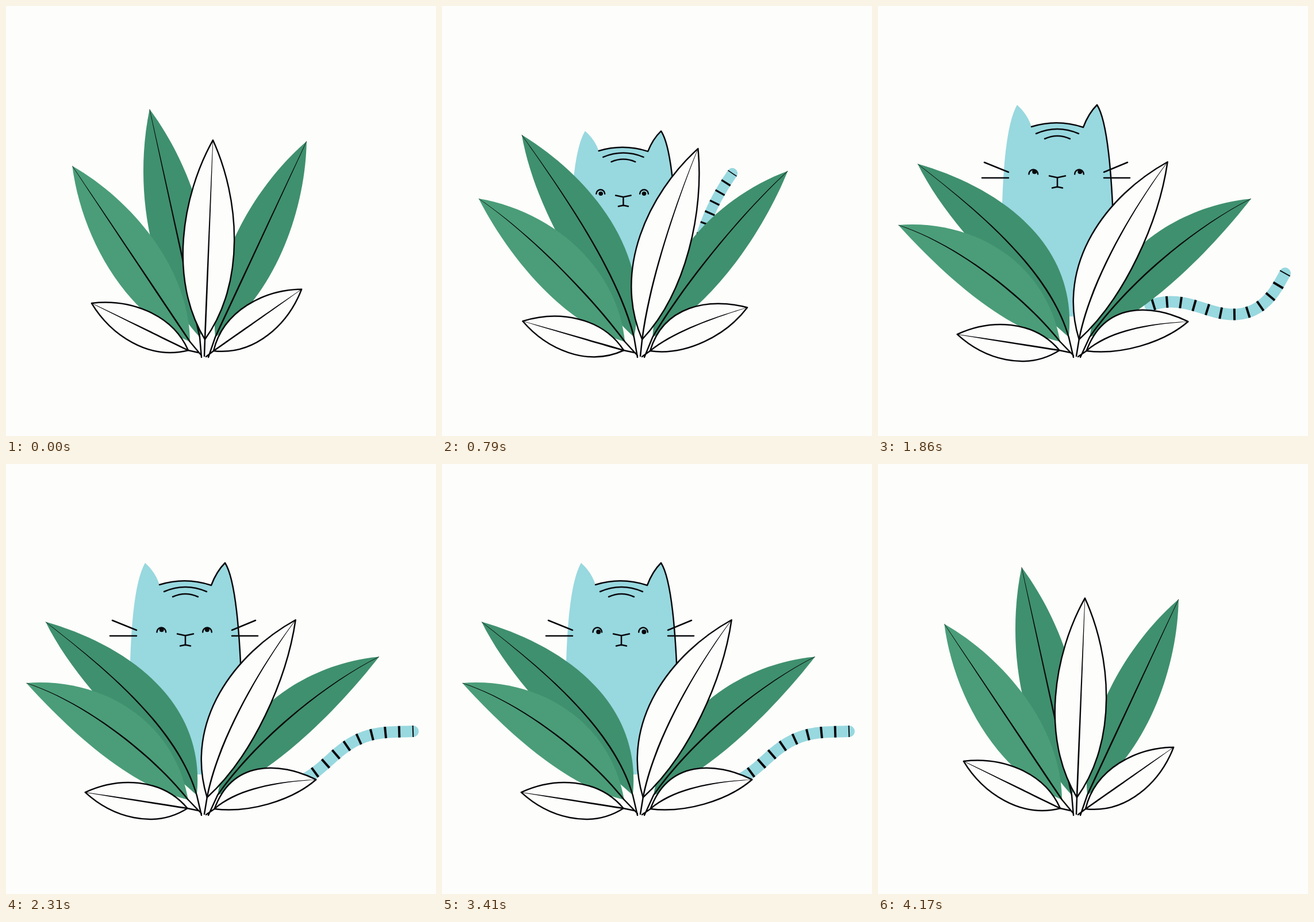
Recreate the animation shown at these times as an HTML page. Size 748x748 px, loop 4320 ms.

```html
<!DOCTYPE html>
<html lang="en">
<head>
<meta charset="utf-8">
<title>Cat in the leaves</title>
<style>
  html, body { margin: 0; width: 100%; height: 100%; overflow: hidden; background: #fdfdfb; }
  svg { display: block; width: 100%; height: 100%; }
  .line { fill: none; stroke: #08080c; stroke-width: 2.5; stroke-linecap: round; stroke-linejoin: round; }
  .band { stroke-linecap: butt; }
  #cat path { vector-effect: non-scaling-stroke; }
</style>
</head>
<body>
<svg viewBox="0 0 748 748">
  <defs><clipPath id="hide"><rect width="748" height="545"/></clipPath></defs>
  <path id="tail" fill="none" stroke="#98d8df" stroke-linecap="round" stroke-linejoin="round"/>
  <path id="tipBand" class="line band"/>
  <path id="bands" class="line band"/>
  <g clip-path="url(#hide)">
    <g id="cat">
      <path fill="#98d8df" d="M267 210Q312 196 357 211Q366 187 381 172Q401 203 408 345L410 540H290L216 345Q220 210 242 172Q260 188 267 210Z"/>
      <path class="line" d="M267 210Q312 196 357 211Q366 187 381 172Q401 203 408 345L410 540"/>
      <path class="line" d="M275 222Q312 206 349 222M290 231Q312 221 334 231"/>
      <path class="line" d="M298 295.500L312 298.500L326 295.500M312 298.500V315M303 316.500L312 314.500L321 316.500"/>
      <path class="line" d="M262.500 292.500a7.800 8 0 0 1 15.600 0M342.200 292.500a7.800 8 0 0 1 15.600 0"/>
      <g id="pupils" fill="#08080c"><circle cx="270.800" cy="292" r="4"/><circle cx="350" cy="292" r="4"/></g>
      <path id="whiskers" class="line"/>
    </g>
  </g>
  <g id="blades"></g>
  <path id="stems" class="line"/>
</svg>
<script>
const LOOP = 4320, RAD = Math.PI / 180;
const DARK = '#3f906e', LIGHT = '#4a9d78', PAPER = '#fdfdfb';
const $ = id => document.getElementById(id);
const set = (id, name, value) => $(id).setAttribute(name, value);
const mix = (a, b, k) => a + (b - a) * k;
const ramp = (t, a, b) => Math.min(1, Math.max(0, (t - a) / (b - a)));
const cubic = u => u < .5 ? 4 * u ** 3 : 1 - 4 * (1 - u) ** 3;
const sine = u => .5 - .5 * Math.cos(Math.PI * u);
// rises over a..b, falls over c..d
const pulse = (t, a, b, c, d, ease) => ease(ramp(t, a, b)) - ease(ramp(t, c, d));

// angle (from upright) and length go from shut to open; bend arches the open leaf
const leaves = [
  { fill: DARK, base: [337, 576], stem: [340, 611], angle: [-12.4, -41.1], length: [406, 400], width: 70, bend: [22, 54] },
  { fill: LIGHT, base: [320, 584], stem: [340, 608], angle: [-33.8, -54.2], length: [368, 347], width: 70, bend: [32, 28] },
  { fill: DARK, base: [364, 576], stem: [352, 611], angle: [25, 49.4], length: [376, 370], width: 64, bend: [27, 28] },
  { fill: PAPER, base: [346, 580], stem: [345, 609], angle: [2.3, 26.5], length: [347, 345], width: 67, bend: [18, 28] },
  { fill: PAPER, base: [317, 599], stem: [335, 603], angle: [-64, -81.1], length: [187, 180], width: 46, bend: [0, 0] },
  { fill: PAPER, base: [361, 600], stem: [348, 610], angle: [55, 73.9], length: [187, 184], width: 48, bend: [12, 25] }
];

function addPath(attrs) {
  const el = document.createElementNS('http://www.w3.org/2000/svg', 'path');
  for (const k in attrs) el.setAttribute(k, attrs[k]);
  return $('blades').appendChild(el);
}
for (const l of leaves) {
  l.blade = addPath(l.fill === PAPER ? { class: 'line', style: 'fill:' + PAPER } : { fill: l.fill });
  l.vein = addPath({ fill: '#08080c' });
}

function drawLeaf(l, open) {
  const a = mix(...l.angle, open) * RAD, len = mix(...l.length, open);
  const dx = Math.sin(a), dy = -Math.cos(a), side = Math.sign(a);
  const drift = (l.angle[1] - l.angle[0]) * len * .00045 * open;
  const bx = l.base[0] + drift, by = l.base[1];
  // a point some way down from the tip, shifted sideways (positive is the arched side)
  const at = (down, shift) => {
    const up = len * (1 - down);
    return `${bx + dx * up + side * dy * shift} ${by + dy * up - side * dx * shift} `;
  };
  // lens around the arched midrib: half widths at tip, both handles and base
  const lens = (w0, w1, w2, w3) => {
    const [b1, b2] = l.bend.map(b => b * open);
    return 'M' + at(0, w0) + 'C' + at(.29, b1 + w1) + at(.71, b2 + w2) + at(1, w3) +
      'L' + at(1, -w3) + 'C' + at(.71, b2 - w2) + at(.29, b1 - w1) + at(0, -w0) + 'Z';
  };
  l.blade.setAttribute('d', lens(0, .76 * l.width, l.width, 0));
  l.vein.setAttribute('d', lens(.3, 1, 1.5, 1.3));
  return `M${bx} ${by}L${l.stem}`;
}

function drawTail(t) {
  const grow = pulse(t, 430, 800, 3800, 4080, cubic);
  const swing = pulse(t, 790, 1450, 3420, 3950, sine);
  const wave = Math.cos(2 * Math.PI * (t - 1860) / 1100);
  const arc = (a, b, c) => mix(mix(a, b, swing), mix(b, c, swing), swing);
  let x = mix(385, arc(505, 660, 708), grow);
  let y = mix(450, arc(291, 300, 465), grow);
  const size = .35 + .48 * grow + .17 * swing;
  const thick = 10 + 10 * size;
  // direction at s bands from the tip: a raised tail eases into a swaying one
  const direction = s => {
    const sway = 29 - 2.2 * s + 32 * Math.cos(Math.PI * s / 6.5) * wave;
    return mix(56 + 3 * s, sway, swing) * RAD;
  };
  const SUB = 4, step = 24 * size / SUB;
  let body = `M${x} ${y}`, bands = '';
  for (let n = 0; n <= 11 * SUB; n++) {
    const s = n / SUB;
    if (n % SUB === 0) {
      const r = direction(Math.max(0, s - .5));
      const hx = Math.sin(r) * thick / 2, hy = Math.cos(r) * thick / 2;
      const band = `M${x - hx} ${y - hy}L${x + hx} ${y + hy}`;
      if (n) bands += band; else set('tipBand', 'd', band);
    }
    const r = direction(Math.max(0, s - .4));
    x -= Math.cos(r) * step;
    y += Math.sin(r) * step;
    body += `L${x} ${y}`;
  }
  set('tail', 'd', body);
  set('tail', 'stroke-width', thick);
  set('bands', 'd', bands);
  $('bands').style.strokeWidth = 4 * size;
  $('tipBand').style.strokeWidth = 2 * size;
}

function drawCat(t) {
  const up = pulse(t, 430, 1000, 3640, 4050, cubic);
  set('cat', 'transform',
    `translate(381 ${mix(403, 172, up)}) scale(${mix(.75, 1, up)} ${mix(.525, 1, up)}) translate(-381 -172)`);

  const right = pulse(t, 1400, 1750, 3480, 3650, sine);
  const left = pulse(t, 2050, 2650, 2850, 3350, sine);
  const above = pulse(t, 1400, 1750, 2850, 3400, sine);
  set('pupils', 'transform', `translate(${1.4 * right - 3.8 * left} ${-3.7 * above})`);

  const grow = pulse(t, 930, 1150, 3620, 3740, sine);
  const hair = (x, y, dx, dy) => `M${x} ${y}l${dx * grow} ${dy * grow}`;
  set('whiskers', 'd', grow < .01 ? '' :
    hair(227, 289, -42, -17) + hair(227, 299, -46, 0) + hair(393, 289, 41, -17) + hair(393, 299, 45, 0));
}

function draw(t) {
  const open = pulse(t, 300, 1230, 3650, 4180, cubic);
  set('stems', 'd', leaves.map(l => drawLeaf(l, open)).join(''));
  drawCat(t);
  drawTail(t);
}

const start = performance.now();
function tick() {
  draw((performance.now() - start) % LOOP);
  requestAnimationFrame(tick);
}
tick();
</script>
</body>
</html>
```
